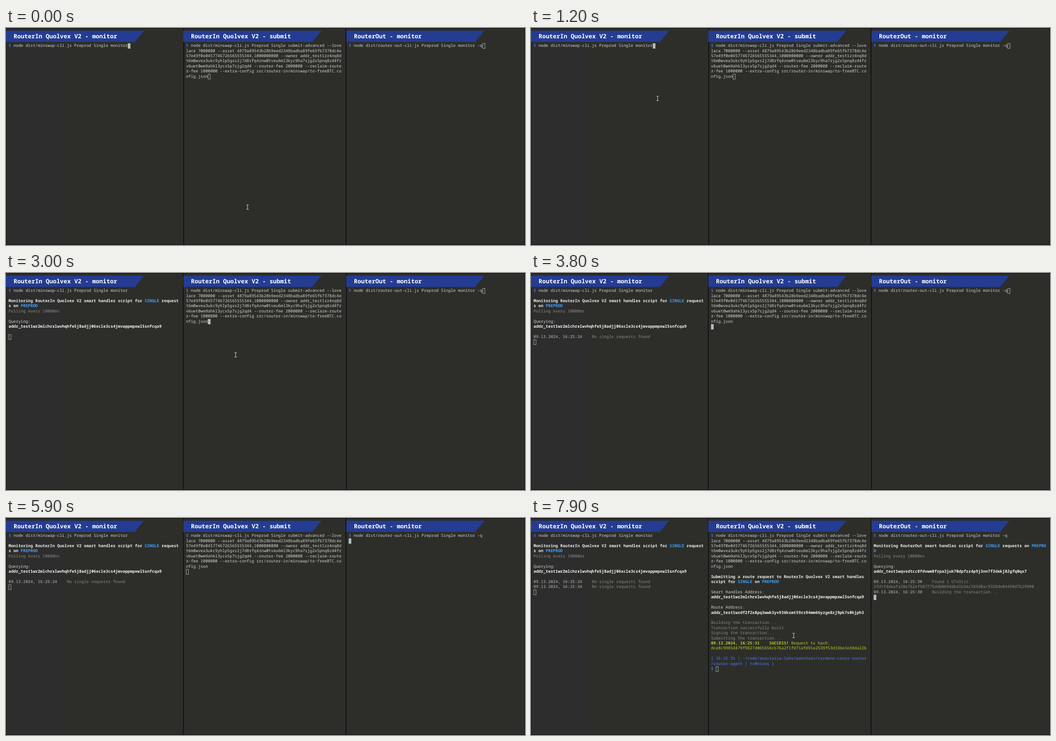
Recreate the animation shown at these times as an HTML page. Size 1156 by 484 pixels, loop 8000 ms.

```html
<!DOCTYPE html>
<html lang="en">
<head>
<meta charset="utf-8">
<title>Router terminals</title>
<style>
  html, body { margin: 0; width: 100%; height: 100%; overflow: hidden; background: #2d2e2a; }
  svg { display: block; width: 1156px; height: 484px; }
  text {
    font: 9.03px "Noto Sans Mono", "DejaVu Sans Mono", monospace;
    font-variant-ligatures: none;
    text-rendering: geometricPrecision;
    white-space: pre;
    fill: #d2d3cc;
  }
  .title { font-size: 13.25px; font-weight: 700; fill: #fff; }
  .bold { font-weight: 700; fill: #ecede6; }
  .addr { font-weight: 600; fill: #f4f4ee; }
  .hot { font-weight: 700; fill: #3fa2ff; }
  .dim { fill: #898a83; }
  .date { font-weight: 700; fill: #8c8d86; }
  .blue { fill: #4f7cff; }
  .ok { fill: #bfca26; }
  .okBold { font-weight: 700; fill: #bfca26; }
</style>
</head>
<body>
<svg id="stage" viewBox="0 0 1156 484"></svg>
<script>
const LOOP = 8000, STEP = 100;
const CELL = 5.42, ROW = 11.42, TOP = 34.3, BASE = 42.2;
const stage = document.getElementById('stage');

function add(parent, tag, attrs = {}, content) {
  const el = document.createElementNS('http://www.w3.org/2000/svg', tag);
  for (const key in attrs) el.setAttribute(key, attrs[key]);
  if (content !== undefined) el.textContent = content;
  parent.appendChild(el);
  return el;
}

// A line is [row, start time, ...parts]; a part is plain text or [class, text].
const date = (clock, cls = 'date') => [cls, `09.13.2024, ${clock}    `];
const idle = (row, at, clock) => [row, at, date(clock), ['dim', 'No single requests found']];
const swapAddr = ['addr', 'addr_test1wr2mlchrxlwvhqhfe5j8adjj06xcle3cs4jmvappmpxwl5snfcqa9'];
const prompt = ['blue', '$ '];

const panes = [
  {
    x: 5.8, edge: 0, title: 'RouterIn Quolvex V2 - monitor',
    lines: [
      [0, 0, prompt, 'node dist/minswap-cli.js Preprod Single monitor'],
      [2, 2000, ['bold', 'Monitoring RouterIn Quolvex V2 smart handles script for '], ['hot', 'SINGLE'], ['bold', ' request']],
      [3, 2000, ['bold', 's on '], ['hot', 'PREPROD']],
      [4, 2000, ['dim', 'Polling every 10000ms']],
      [6, 2000, 'Querying:'],
      [7, 2000, swapAddr],
      idle(9, 3700, '16:25:24'),
      idle(10, 7600, '16:25:34')
    ],
    cursor: [[0, 0, 49], [1600, 1, 0], [2000, 9, 0], [3700, 10, 0], [7600, 11, 0]]
  },
  {
    x: 400.9, edge: 395, title: 'RouterIn Quolvex V2 - submit',
    lines: [
      [0, 0, prompt, 'node dist/minswap-cli.js Preprod Single submit-advanced --love'],
      [1, 0, 'lace 7000000 --asset 4879a89543b28b9eed2348badba89fe65fb7378dc4e'],
      [2, 0, '57e49f0e0457746726565555344,1000000000 --owner addr_test1zr4nq8d'],
      [3, 0, 't6m0wvea3ukc9yhlp5gxs2j7d8rfq4znw0tveu6ml3kyc9ha7sjg2x5pnq8zd4fr'],
      [4, 0, 'v6uet0wm9ahkl3ycx5p7sjg2qd4 --router-fee 2000000 --reclaim-route'],
      [5, 0, 'r-fee 1000000 --extra-config src/router-in/minswap/to-freeBTC.co'],
      [6, 0, 'nfig.json'],
      [8, 6000, ['bold', 'Submitting a route request to RouterIn Quolvex V2 smart handles']],
      [9, 6000, ['bold', 'script for '], ['hot', 'SINGLE'], ['bold', ' on '], ['hot', 'PREPROD']],
      [11, 6000, 'Smart Handles Address:'],
      [12, 6000, swapAddr],
      [14, 6000, 'Route Address:'],
      [15, 6000, ['addr', 'addr_test1wrdf2f2x8pq3wwk3yv936ksmt59rz94mm66yzge8zj9pk7s0kjph3']],
      [17, 6000, ['dim', 'Building the transaction...']],
      [18, 6400, ['dim', 'Transaction successfully built.']],
      [19, 6400, ['dim', 'Signing the transaction...']],
      [20, 6400, ['dim', 'Submitting the transaction...']],
      [21, 6800, date('16:25:31', 'okBold'), ['okBold', 'SUCCESS!'], ['ok', ' Request tx hash:']],
      [22, 6800, ['ok', 'dce8c9985d479f9827d065656cb76a2f1fd71afd91e2539f53d33be1e38da226']],
      [24, 6900, ['blue', '[ 16:25:31 | ~/code/anastasia-labs/wanchain/cardano-cross-router']],
      [25, 6900, ['blue', '/router-agent | tv@nixos ]']],
      [26, 6900, prompt]
    ],
    cursor: [[0, 6, 9], [3500, 7, 0], [6000, 18, 0], [6400, 21, 0], [6800, 23, 0], [6900, 26, 2]]
  },
  {
    x: 763.3, edge: 758, title: 'RouterOut - monitor',
    lines: [
      [0, 0, prompt, 'node dist/router-out-cli.js Preprod Single monitor -q'],
      [2, 6000, ['bold', 'Monitoring RouterOut smart handles script for '], ['hot', 'SINGLE'], ['bold', ' requests on '], ['hot', 'PREPRO']],
      [3, 6000, ['hot', 'D']],
      [4, 6000, ['dim', 'Polling every 10000ms']],
      [6, 6000, 'Querying:'],
      [7, 6000, ['addr', 'addr_test1wqvsdtcc8fdvwm8frpa3juk70dpfzz4p9j3nn7f3dekj82gfq0qx7']],
      [9, 6200, date('16:25:30'), ['dim', 'Found 1 UTxO(s):']],
      [10, 6200, ['dim', '2fd1fddeafa28e762ef507f75ddb0b94dbd1b34c58560ac9328de04498d7b299#0']],
      [11, 6200, date('16:25:30'), ['dim', 'Building the transaction...']]
    ],
    cursor: [[0, 0, 55], [5400, 1, 0], [6000, 9, 0], [6200, 12, 0]]
  }
];

// [time, focused pane, divider 1 x, divider 2 x]
const focus = [[0, 0, 395, 756.5], [2700, 1, 394, 757.5], [4900, 2, 394.5, 756.5]];

// Pointer strokes: [from, to, x0, y0, x1, y1, hidden from]
const moves = [
  [0, 900, 538, 399.5, 282, 157, 1600],
  [2200, 2800, 282, 157, 511.5, 182.5, 3500],
  [4100, 4700, 511.5, 182.5, 849, 159, 5400],
  [7200, 7700, 849, 159, 585, 262, LOOP]
];

add(stage, 'rect', { width: 1156, height: 484, fill: '#2d2e2a' });
add(stage, 'rect', { width: 127, height: 484, fill: '#2d2d2d' });
const dividers = [0, 1].map(() => add(stage, 'rect', { y: 0, width: 1.6, height: 484, fill: '#0b0b0a' }));
add(stage, 'path', { d: 'M0.5 0.5H1155.5V483.5H0.5Z', fill: 'none', stroke: '#0b0b0a' });

for (const pane of panes) {
  const e = pane.edge;
  add(stage, 'path', { d: `M${e} 6H${e + 307.5}L${e + 287} 31H${e}Z`, fill: '#243c92' });
  add(stage, 'text', { class: 'title', x: e + 17, y: 23.3 }, pane.title);
  pane.nodes = pane.lines.map(([row, at, ...parts]) => {
    const node = add(stage, 'text', { x: pane.x, y: BASE + row * ROW });
    for (const part of parts) {
      const [cls, str] = Array.isArray(part) ? part : ['', part];
      add(node, 'tspan', { class: cls }, str);
    }
    return { node, at };
  });
  pane.box = add(stage, 'rect', { width: 5, height: 11, stroke: '#b4b8b2', 'stroke-width': 0.9 });
}

const beam = 'M-3 -5H-1Q0 -5 0 -4Q0 -5 1 -5H3M0 -4V4M-3 5H-1Q0 5 0 4Q0 5 1 5H3';
const pointer = add(stage, 'g', { fill: 'none' });
add(pointer, 'path', { d: beam, stroke: '#161616', 'stroke-width': 2.6 });
add(pointer, 'path', { d: beam, stroke: '#dededa', 'stroke-width': 1.2 });

const latest = (steps, t) => steps.filter(s => s[0] <= t).pop();
const show = (el, on) => el.setAttribute('visibility', on ? 'visible' : 'hidden');
const ease = p => p * p * (3 - 2 * p);

function render(t) {
  const [, active, ...edges] = latest(focus, t);
  edges.forEach((x, i) => dividers[i].setAttribute('x', x));

  panes.forEach((pane, i) => {
    for (const { node, at } of pane.nodes) show(node, t >= at);
    const [, row, col] = latest(pane.cursor, t);
    pane.box.setAttribute('x', pane.x + col * CELL + 0.4);
    pane.box.setAttribute('y', TOP + row * ROW + 0.2);
    pane.box.setAttribute('fill', i === active ? '#b9c1bd' : 'none');
  });

  const [from, to, x0, y0, x1, y1, end] = latest(moves, t);
  const p = ease(Math.min(1, (t - from) / (to - from)));
  pointer.setAttribute('transform', `translate(${x0 + (x1 - x0) * p} ${y0 + (y1 - y0) * p})`);
  show(pointer, t < end);
}

const start = performance.now();
function tick() {
  const t = (performance.now() - start) % LOOP;
  render(Math.floor(t / STEP) * STEP);
  requestAnimationFrame(tick);
}
tick();
</script>
</body>
</html>
```
